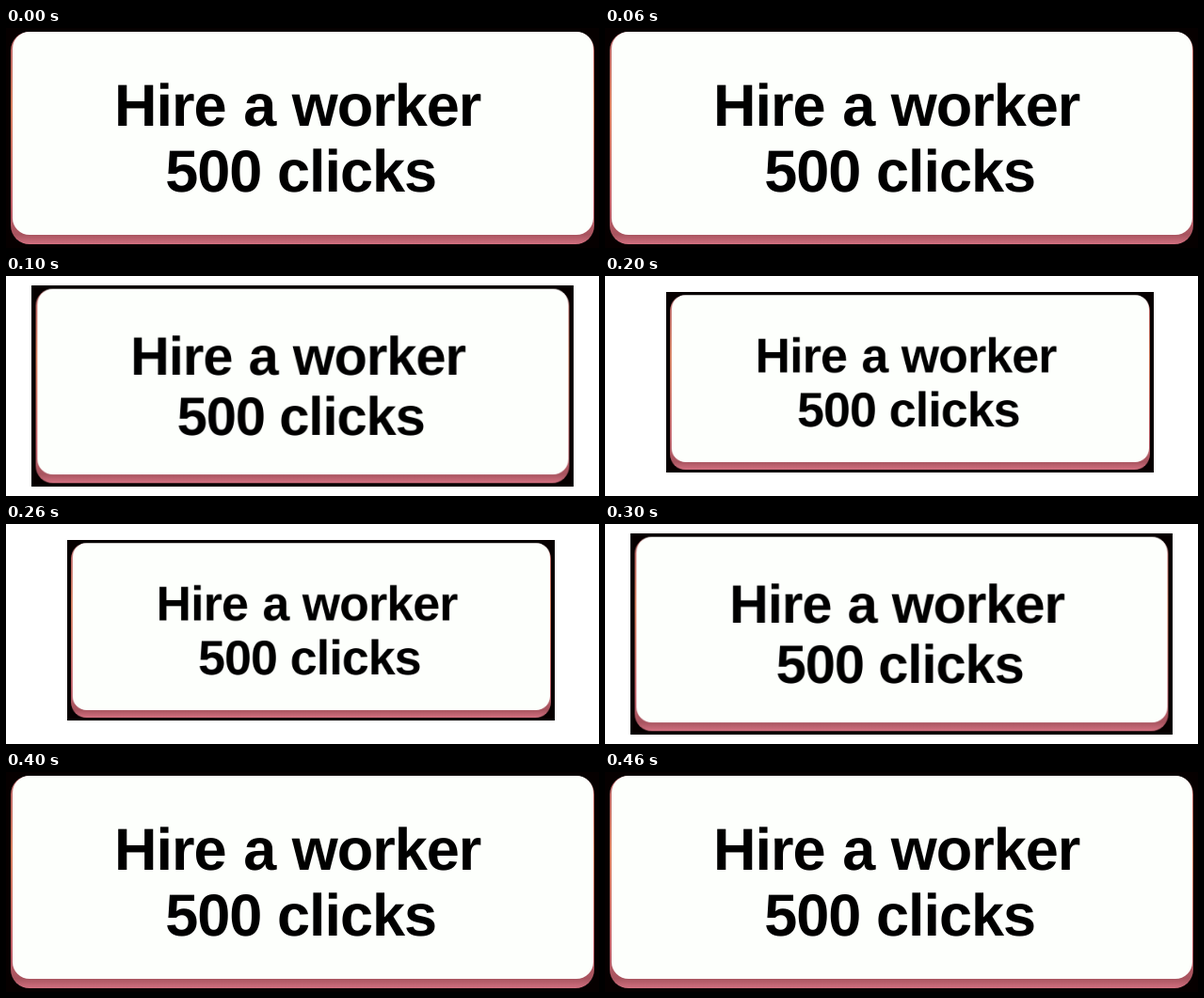
These frames come from a looping animation (630x234 px, 0.5 s). An HTML page:

```html
<!DOCTYPE html>
<html lang="en">
<head>
<meta charset="utf-8">
<title>Hire a worker</title>
<style>
  html, body {
    margin: 0;
    width: 100%;
    height: 100%;
    overflow: hidden;
    background: #fff;
  }
  svg {
    display: block;
    width: 630px;
    height: 234px;
  }
  .button {
    transform-origin: 0 0;
    animation: press 500ms step-end infinite;
  }
  text {
    font: bold 63px "Liberation Sans", Arial, sans-serif;
    letter-spacing: -1px;
    text-rendering: geometricPrecision;
  }

  @keyframes press {
    0%, 80%, 100% { transform: none; }
    20%, 60% { transform: translate(27px, 10px) scale(0.9143); }
    40% { transform: translate(65px, 17px) scale(0.8222); }
  }
</style>
</head>
<body>
<svg viewBox="0 0 630 234">
  <defs>
    <linearGradient id="edge" x1="0" y1="0" x2="0" y2="1">
      <stop offset="0" stop-color="#b8646a"/>
      <stop offset="0.35" stop-color="#d8805f"/>
      <stop offset="0.8" stop-color="#c4646c"/>
      <stop offset="0.955" stop-color="#a8545f"/>
      <stop offset="1" stop-color="#d27080"/>
    </linearGradient>
  </defs>
  <g class="button">
    <rect width="630" height="234" fill="#060000"/>
    <rect x="5" y="4" width="620" height="226" rx="20" fill="url(#edge)"/>
    <rect x="7" y="4" width="617" height="216" rx="18" fill="#fdfffc"/>
    <text y="103.5">
      <tspan x="115">Hire</tspan>
      <tspan x="252.3">a</tspan>
      <tspan x="303.7">worker</tspan>
    </text>
    <text y="173.5">
      <tspan x="169.3">500</tspan>
      <tspan x="288">clicks</tspan>
    </text>
  </g>
</svg>
</body>
</html>
```
